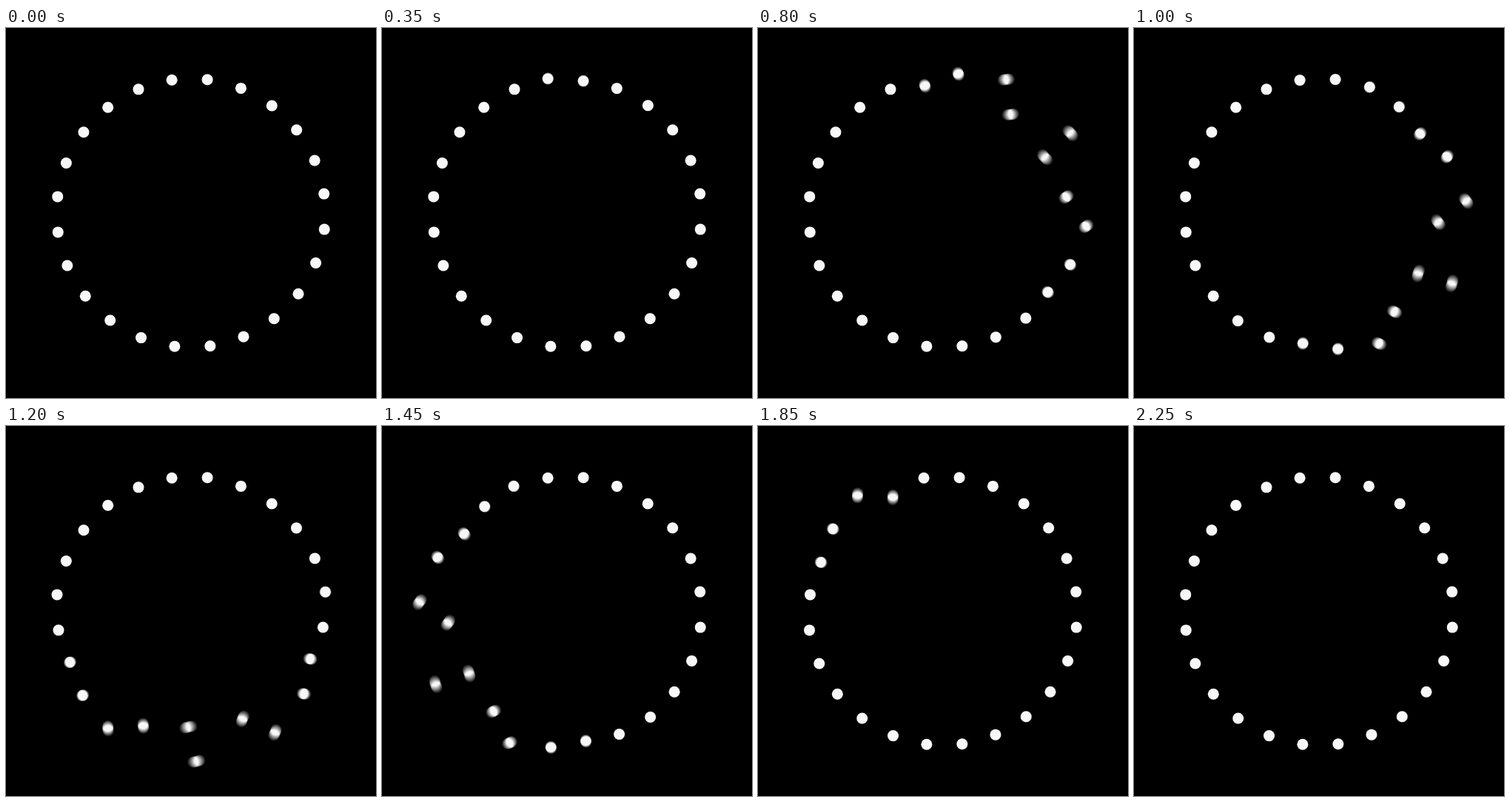
An HTML page with a canvas that plays this animation: 500x500 px, repeating every 2.4 s.

```html
<!DOCTYPE html>
<html lang="en">
<head>
<meta charset="utf-8">
<title>Swapping dots</title>
<style>
  html, body { margin: 0; width: 100%; height: 100%; overflow: hidden; background: #000; }
  canvas { display: block; }
</style>
</head>
<body>
<canvas id="stage" width="500" height="500"></canvas>
<script>
const ctx = document.getElementById('stage').getContext('2d');
const LOOP = 2400, STEP = 50, STAGGER = 100, MIDPOINT = 625;
const PAIRS = 12, RING = 180, ORBIT = 24, DOT = 7.5;
const SAMPLES = 13, SHUTTER = 50;
const TILT = -Math.PI / 2 - 0.0105;

// Half turn with a bell-shaped speed, centred on time zero
function turn(ms) {
  const z = ms / 139;
  return Math.PI / 2 * (1 + Math.tanh(0.798 * z + 0.0357 * z ** 3));
}

function dot(x, y) {
  ctx.beginPath();
  ctx.arc(x, y, DOT, 0, 2 * Math.PI);
  ctx.fill();
}

function drawPairs(time) {
  for (let k = 0; k < PAIRS; k++) {
    const place = TILT + k * 2 * Math.PI / PAIRS;
    const direction = k % 2 ? -1 : 1;
    const angle = place + Math.PI / 2 + direction * turn(time - MIDPOINT - k * STAGGER);
    const x = 250 + RING * Math.cos(place), y = 250 + RING * Math.sin(place);
    const dx = ORBIT * Math.cos(angle), dy = ORBIT * Math.sin(angle);
    dot(x + dx, y + dy);
    dot(x - dx, y - dy);
  }
}

function render(now) {
  const time = Math.floor(now % LOOP / STEP) * STEP;
  ctx.globalCompositeOperation = 'source-over';
  ctx.fillStyle = '#000';
  ctx.fillRect(0, 0, 500, 500);

  // Motion blur: add up dim copies across the shutter time
  ctx.globalCompositeOperation = 'lighter';
  ctx.fillStyle = 'rgb(19, 19, 19)';
  for (let i = 0; i < SAMPLES; i++) {
    drawPairs(time + SHUTTER * ((i + 0.5) / SAMPLES - 0.5));
  }
}

let start;
function tick(now) {
  start ??= now;
  render(now - start);
  requestAnimationFrame(tick);
}
requestAnimationFrame(tick);
</script>
</body>
</html>
```
